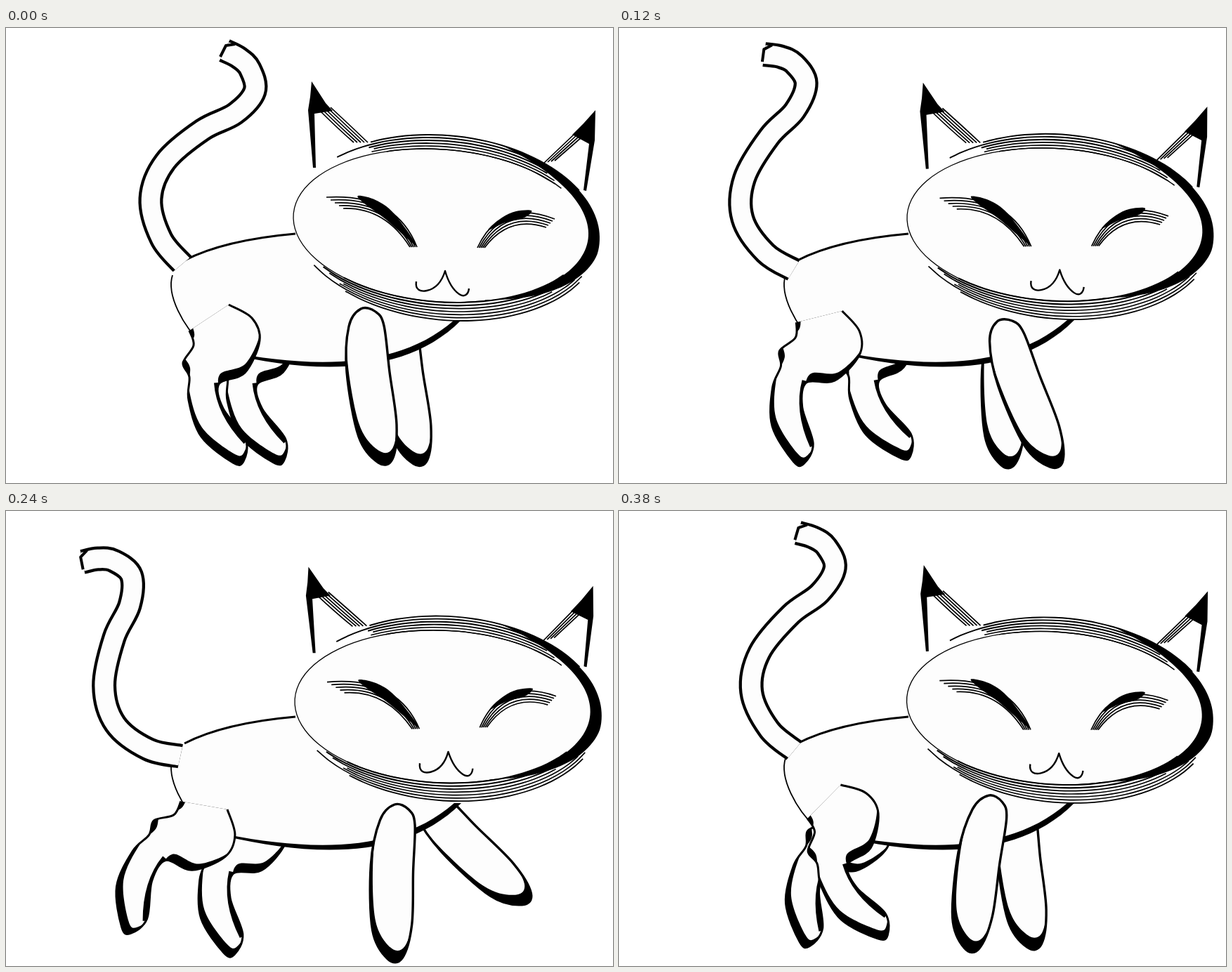
An HTML page with a canvas that plays this animation: 864 px wide and 648 px high, repeating every 400 ms.

```html
<!DOCTYPE html>
<html lang="en">
<head>
<meta charset="utf-8">
<title>Walking cat</title>
<style>
  html, body { margin: 0; height: 100%; overflow: hidden; background: #fff; }
  canvas { display: block; }
</style>
</head>
<body>
<canvas id="stage" width="864" height="648"></canvas>
<script>
const ctx = document.getElementById('stage').getContext('2d');
const INK = '#000', FUR = '#fdfdfd';
const LOOP = 400, STEP = 20, SWING_PEAK = 280, SWING_BACK = 130;

// Leg poses at these times: [dx, dy, degrees]
const TIMES = [0, 80, 160, 240, 350, 380, LOOP];
const GAIT = {
  nearHind: [[0, 0, 0], [-1, -4, 10.6], [-2, -6, 28.3], [0, 0, 43.4], [7, 11, -37], [2, 4, -12]],
  farHind: [[52, 1, -1.5], [58, -6, -13.5], [57, 3, 2.7], [51, 6, 17], [50, 7, 39], [49, 1, 30.7]],
  nearFront: [[0, 0, 0], [23, 13, -12], [44, 23, -15], [48, 18, 9], [45, 10, 42], [21, 5, 15.5]],
  farFront: [[46, 2, -1], [40, 2, 10.5], [47, 2, 5], [77, 2, -37.5], [59, 1, 7], [55, 2, 1]]
};

let seed = 7;
const random = () => (seed = seed * 16807 % 2147483647) / 2147483647;
const times = (n, make) => Array.from({ length: n }, (_, i) => make(i));

// Smooth path through points given as x, y, x, y, ...
function curve(closed, ...flat) {
  const n = flat.length / 2, path = new Path2D();
  const at = i => {
    const j = closed ? (i + n) % n : Math.max(0, Math.min(n - 1, i));
    return [flat[2 * j], flat[2 * j + 1]];
  };
  path.moveTo(...at(0));
  for (let i = 0; i < n - !closed; i++) {
    const [a, b, c, d] = [at(i - 1), at(i), at(i + 1), at(i + 2)];
    path.bezierCurveTo(b[0] + (c[0] - a[0]) / 6, b[1] + (c[1] - a[1]) / 6,
                       c[0] - (d[0] - b[0]) / 6, c[1] - (d[1] - b[1]) / 6, ...c);
  }
  return path;
}

function fill(path, color = INK) { ctx.fillStyle = color; ctx.fill(path); }
function stroke(path, width, color = INK) {
  ctx.strokeStyle = color;
  ctx.lineWidth = width;
  ctx.stroke(path);
}

const tail = curve(false, 251,336, 221,300, 206,243, 227,190, 280,145, 326,122, 354,90, 347,58,
  331,42, 311,32);
const tailTip = new Path2D('M305 41L313 25L326 23');

const body = new Path2D('M412 293Q310 302 254 331L237 352C228 380 252 425 281 452L315 462C430 488 560 492 645 416Z');
const back = new Path2D('M254 331Q310 302 412 293');
const rump = new Path2D('M237 352C228 380 252 425 281 452');
const belly = new Path2D('M315 464C430 490 565 500 648 416H638C555 489 430 483 315 461Z');

const hind = curve(false, 317,394, 350,413, 361,445, 340,491, 303,507, 309,542, 341,586, 338,617,
  323,619, 278,582, 260,530, 261,497, 252,477, 267,452, 261,431);
const shin = new Path2D('M302 505Q305 548 343 588');
const front = curve(true, 505,400, 526,404, 538,424, 546,490, 556,565, 550,614, 530,619, 502,582,
  485,490, 488,425);

// Point on the rim of the face: depth 0 is the inner edge, 1 the outer
function rim(angle, depth) {
  const mix = (a, b) => a + (b - a) * depth;
  return [mix(619, 626) + mix(210, 219) * Math.cos(angle),
          mix(281.5, 284.5) + mix(109.5, 132.5) * Math.sin(angle + 0.11)];
}
const arc = (from, to, depthAt, n = 16) =>
  times(n + 1, i => from + (to - from) * i / n).flatMap(a => rim(a, depthAt(a)));

const face = curve(true, ...arc(-3.1, 3.1, a => Math.abs(a) > 2 ? 0.2 : 1, 40));
const shade = curve(true,
  ...arc(-1.2, 1.25, a => 1 - Math.max(0, a - 0.2)),
  ...arc(1.25, -1.2, a => Math.max(0, -a / 1.2) ** 2));
const strand = (from, to, depth) =>
  ({ path: curve(false, ...arc(from, to, () => depth)), width: 1.3 + random() * 0.9 });
const strands = [
  strand(1.2, 5.6, 0),
  ...times(6, i => strand(-2.5 + random() * 0.6, -0.5 - random() * 0.4, i / 5)),
  ...times(7, i => strand(0.4 + random() * 0.4, 2.75 - random() * 0.5, i / 6))
];

// Hairs that drift step by step from one curve to the next
const fan = (n, from, bend, to, drift) => new Path2D(times(n, i => {
  const p = ([x, y], k) => `${x + drift[k] * i} ${y + drift[k + 1] * i}`;
  return `M${p(from, 0)}Q${p(bend, 2)} ${p(to, 4)}`;
}).join(''));
const hairs = [
  fan(5, [456, 241], [555, 235], [585, 312], [6, 4, -4, 5, -2.5, 0]),
  fan(5, [781, 272], [704, 242], [671, 313], [-3, 3, 3, 6, 2.5, 0]),
  fan(5, [462, 113], [489, 138], [515, 163], [-4, 1, -4.5, 1, -5, 0]),
  fan(4, [808, 152], [787, 172], [766, 192], [4, 1, 4.5, 0, 5, -1])
];
const brows = [
  curve(true, 501,239, 526,245, 552,264, 584,310, 540,272, 510,250),
  curve(true, 686,288, 706,270, 726,261, 748,260, 738,270, 711,277)
];
const ears = new Path2D('M435 76L455 107L465 118L439 122L441 199H437L430 117L433 98Z' +
  'M839 117L838 160L826 232L822 231L830 165L806 152L822 136Z');
const mouth = new Path2D('M584 361C582 373 590 376 599 374C613 371 621 359 625 346C629 360 635 372 645 379C652 384 658 380 659 371');

// White shape whose underside stays black
function drawLeg(shape, lift, width, accent) {
  fill(shape);
  ctx.save();
  ctx.clip(shape);
  ctx.translate(1, -lift);
  fill(shape, FUR);
  ctx.translate(-1, lift);
  if (accent) stroke(accent, 12);
  ctx.restore();
  stroke(shape, width);
}
const drawHind = () => drawLeg(hind, 13, 3, shin);
const drawFront = () => drawLeg(front, 17, 3.4);

function drawBody() {
  fill(body, FUR);
  stroke(back, 3);
  stroke(rump, 1.8);
  fill(belly);
}

function drawTail() {
  stroke(tail, 35);
  stroke(tail, 26.5, FUR);
  stroke(tailTip, 4);
}

function drawHead() {
  fill(face, FUR);
  fill(shade);
  strands.forEach(s => stroke(s.path, s.width));
  fill(ears);
  brows.forEach(b => fill(b));
  hairs.forEach(h => stroke(h, 1.7));
  stroke(mouth, 2.4);
}

function posed([px, py], [dx, dy, degrees], draw) {
  ctx.save();
  ctx.translate(px + dx, py + dy);
  ctx.rotate(degrees * Math.PI / 180);
  ctx.translate(-px, -py);
  draw();
  ctx.restore();
}

function gait(leg, t) {
  const keys = GAIT[leg];
  const i = TIMES.findIndex(end => end > t) - 1;
  const k = (t - TIMES[i]) / (TIMES[i + 1] - TIMES[i]);
  const next = keys[(i + 1) % keys.length];
  return keys[i].map((v, j) => v + (next[j] - v) * k);
}

function render(now) {
  const t = Math.floor((now % LOOP) / STEP) * STEP;
  const swing = t < SWING_PEAK ? t / SWING_PEAK : 1 - (t - SWING_PEAK) / SWING_BACK;
  const hip = [277, 407], shoulder = [505, 401];
  ctx.fillStyle = '#fff';
  ctx.fillRect(0, 0, 864, 648);
  ctx.lineJoin = 'round';
  posed(hip, gait('farHind', t), drawHind);
  posed(shoulder, gait('farFront', t), drawFront);
  drawBody();
  posed([267, 346], [0, 3 * Math.sin(Math.PI * swing), -44.2 * swing], drawTail);
  posed(hip, gait('nearHind', t), drawHind);
  posed(shoulder, gait('nearFront', t), drawFront);
  posed([535, 211], [0, 0, -2.25 * swing], drawHead);
}

const start = performance.now();
function tick() {
  render(performance.now() - start);
  requestAnimationFrame(tick);
}
tick();
</script>
</body>
</html>
```
